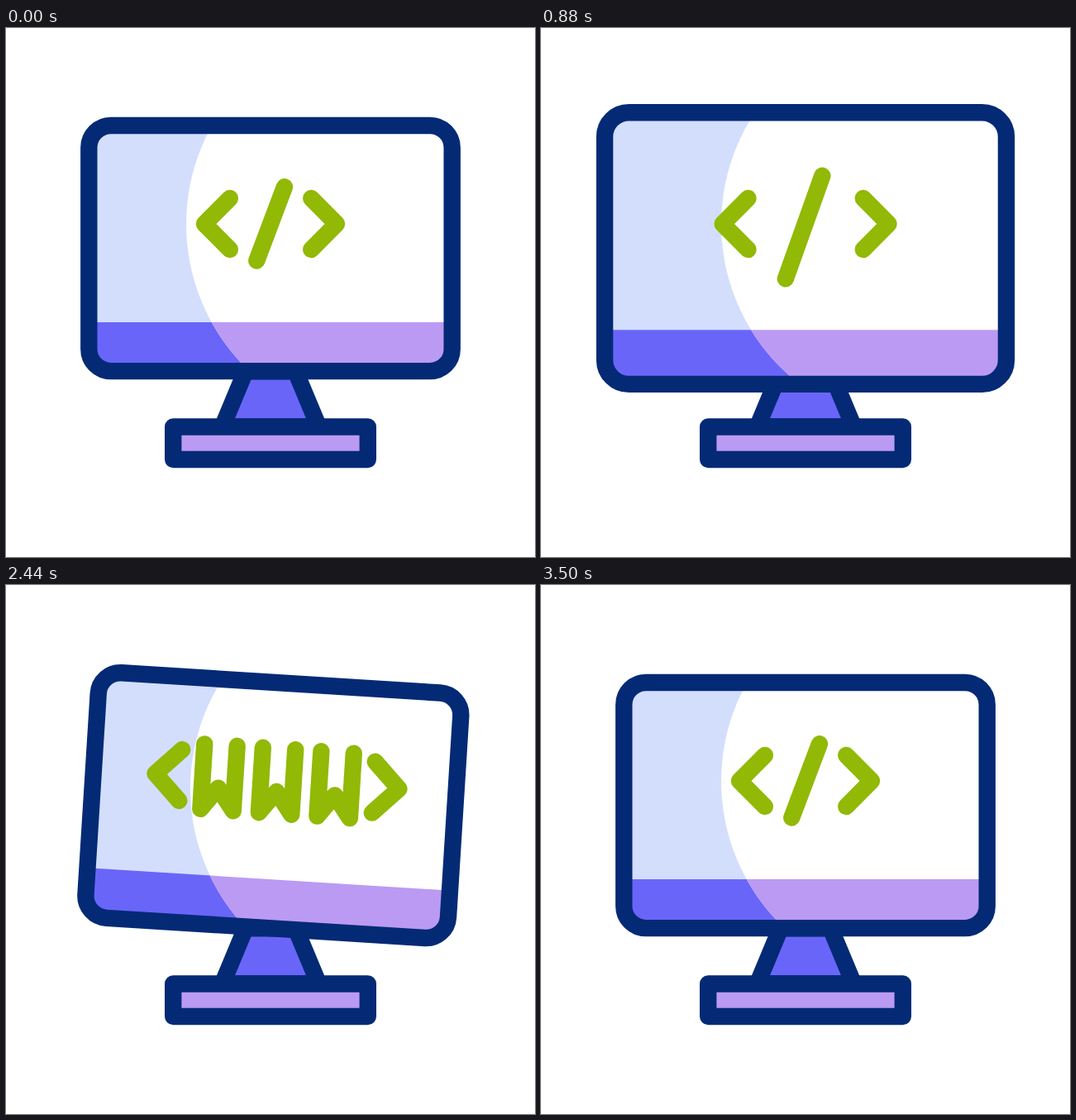
These frames come from a looping animation (640x640 px, 3.6 s). An HTML page:

```html
<!DOCTYPE html>
<html lang="en">
<head>
<meta charset="utf-8">
<title>Coding monitor</title>
<style>
  html, body { margin: 0; width: 100%; height: 100%; overflow: hidden; background: #fff; }
  svg { display: block; width: 100vw; height: 100vh; }
  .line { fill: none; stroke-width: 20.4; stroke-linecap: round; stroke-linejoin: round; }
  .navy { stroke: #042a75; }
  .green { stroke: #91b906; }
</style>
</head>
<body>
<svg viewBox="0 0 640 640">
  <defs>
    <clipPath id="screenClip"><rect class="panel"/></clipPath>
    <clipPath id="glowClip"><circle cx="462.5" cy="237.3" r="244.5"/></clipPath>
  </defs>

  <path class="line navy" style="fill:#6a65f9" d="M289.7 415.3H350.3L378.3 482.5H261.7Z"/>
  <path class="line navy" style="fill:#bb9af3" d="M202.2 482.5H437.8V522H202.2Z"/>

  <g id="monitor">
    <g clip-path="url(#screenClip)">
      <rect width="640" height="640" fill="#d3defd"/>
      <rect class="band" width="640" height="200" fill="#6a65f9"/>
      <g clip-path="url(#glowClip)">
        <rect width="800" height="640" fill="#fff"/>
        <rect class="band" width="800" height="200" fill="#bb9af3"/>
      </g>
    </g>
    <rect class="panel line navy"/>
    <path id="slash" class="line green"/>
    <g id="letters"></g>
    <path id="open" class="line green" d="M270.9 206L240 237L270.9 268"/>
    <path id="close" class="line green" d="M369.2 206L400 237L369.2 268"/>
  </g>
</svg>
<script>
const LOOP = 3600;
const $ = id => document.getElementById(id);
const all = sel => [...document.querySelectorAll(sel)];
const panels = all('.panel'), bands = all('.band');
const mix = (a, b, k) => a + (b - a) * k;

// Each track is a list of [time, value] keys, eased in and out.
const pulse = [[0, 0], [300, 1], [600, 0], [900, 1], [1200, 0]];
const tilt = [[2100, 0], [2400, 4], [2700, -4], [2900, 4], [3200, -4], [3500, 0]];
const openShift = [[1200, 0], [1520, -65], [3200, -65], [3500, 0]];
const closeShift = [[1233, 0], [1500, -72], [1800, -0.6], [2100, 70.6], [3200, 70.6], [3500, 0]];
const slashSize = [[1200, 1], [1275, 0], [3330, 0], [3500, 1]];
const typing = [[1300, 1500], [1500, 1800], [1800, 2100]]
  .map(([from, to]) => [[from, 0], [to, 1], [3000, 1], [3240, 0]]);

function at(keys, t) {
  if (t <= keys[0][0]) return keys[0][1];
  for (let i = 1; i < keys.length; i++) {
    const [t0, v0] = keys[i - 1], [t1, v1] = keys[i];
    if (t <= t1) {
      const u = (t - t0) / (t1 - t0);
      return mix(v0, v1, u * u * (3 - 2 * u));
    }
  }
  return keys[keys.length - 1][1];
}

const letters = typing.map((_, i) => {
  const p = document.createElementNS('http://www.w3.org/2000/svg', 'path');
  const x = 232.4 + i * 70.7;
  p.setAttribute('d', `M${x} 197.6V276.2L${x + 19.8} 249.7L${x + 39.5} 276.2V197.6`);
  p.setAttribute('class', 'line green');
  p.setAttribute('pathLength', 1);
  $('letters').append(p);
  return p;
});

function set(el, attrs) {
  for (const k in attrs) el.setAttribute(k, attrs[k]);
}

function show(el, on) {
  el.style.display = on ? '' : 'none';
}

function draw(t) {
  const k = at(pulse, t);

  const x = mix(100.3, 76.8, k), y = mix(118, 102, k);
  const box = { x, y, width: 640 - 2 * x, height: 533.1 - 2 * y, rx: mix(26.7, 29.3, k) };
  panels.forEach(p => set(p, box));
  bands.forEach(b => set(b, { y: mix(356, 365.4, k) }));
  set($('monitor'), { transform: `rotate(${at(tilt, t)} 320 320)` });

  set($('open'), { transform: `translate(${at(openShift, t) - 20.6 * k} 0)` });
  set($('close'), { transform: `translate(${at(closeShift, t) + 20.8 * k} 0)` });

  const s = at(slashSize, t);
  const dx = mix(16.8, 22.3, k) * s, dy = mix(44.6, 62.5, k) * s;
  const cx = mix(320.1, 318.1, k), cy = mix(236.9, 241.1, k);
  set($('slash'), { d: `M${cx + dx} ${cy - dy}L${cx - dx} ${cy + dy}` });
  show($('slash'), s > 0.01);

  letters.forEach((p, i) => {
    const part = at(typing[i], t);
    show(p, part > 0.005);
    set(p, { 'stroke-dasharray': part < 1 ? `${part} 2` : 'none' });
  });
}

const start = performance.now();
function tick() {
  draw((performance.now() - start) % LOOP);
  requestAnimationFrame(tick);
}
draw(0);
requestAnimationFrame(tick);
</script>
</body>
</html>
```
